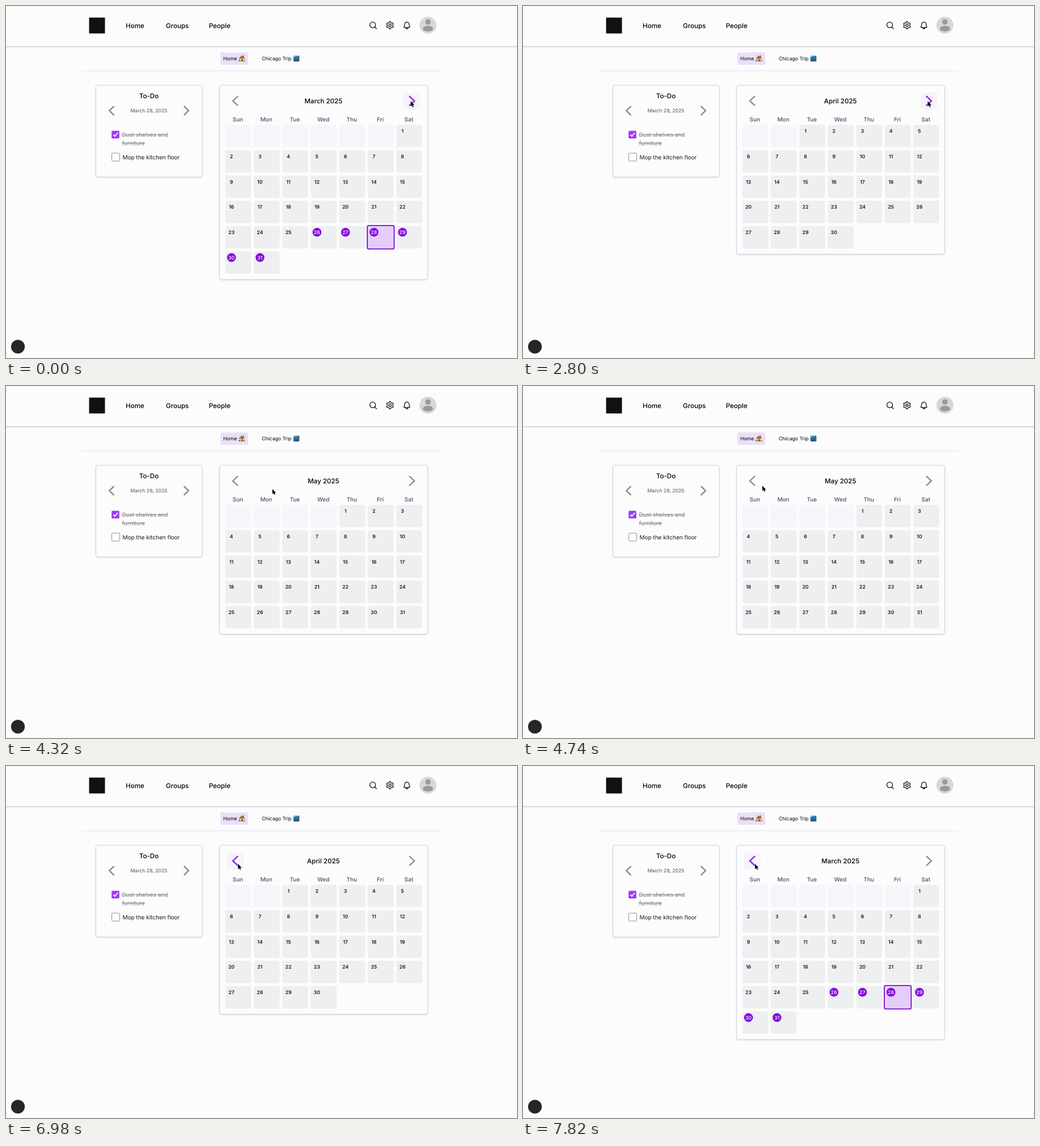
An HTML page that plays this animation: 901 px wide and 622 px high, repeating every 8000 ms.

```html
<!DOCTYPE html>
<html lang="en">
<head>
<meta charset="utf-8">
<title>Shared calendar</title>
<style>
html, body { margin: 0; width: 100%; height: 100%; overflow: hidden; background: #fcfcfc; }
svg { display: block; width: 901px; height: 622px; font-family: Inter, "Liberation Sans", sans-serif; text-rendering: geometricPrecision; }
.mid { text-anchor: middle; }
.nav { font-size: 11.6px; font-weight: 500; }
.small { font-size: 8.7px; }
.body { font-size: 10px; }
.day { font-size: 8.7px; font-weight: 600; text-anchor: middle; fill: #18181b; }
.line { fill: none; stroke: #111; stroke-width: 1.3; stroke-linecap: round; stroke-linejoin: round; }
.chev { fill: none; stroke: #8792a8; stroke-width: 2.5; }
.card { fill: #fcfcfd; stroke: #ccd3e2; filter: drop-shadow(0 1px 1px #0002); }
</style>
</head>
<body>
<svg viewBox="0 0 901 622">
  <rect width="901" height="622" fill="#fcfcfc"/>
  <rect y="72" width="901" height="2" fill="#f1f1f4"/>
  <rect y="71" width="901" height="1.3" fill="#c9c9d4"/>
  <path d="M134 114.5H768" stroke="#e1e3e6"/>

  <rect x="146.5" y="20.5" width="28" height="28" fill="#111"/>
  <g class="nav">
    <text x="211" y="38.5">Home</text>
    <text x="282" y="38.5">Groups</text>
    <text x="357.7" y="38.5">People</text>
  </g>
  <g class="line">
    <circle cx="646.6" cy="33.4" r="5"/>
    <path d="M650.2 37.2L653.3 40.3"/>
    <path id="gear"/>
    <circle cx="677" cy="34" r="2.1"/>
    <path d="M701.4 37.3C702.8 35.8 702.9 34 702.9 32.3A3.9 3.9 0 0 1 710.7 32.3C710.7 34 710.8 35.8 712.2 37.3Q706.8 39 701.4 37.3M704.9 38.4A1.9 1.9 0 0 0 708.7 38.4"/>
  </g>
  <circle cx="744" cy="34" r="15" fill="#d7d7d7"/>
  <circle cx="744" cy="28.2" r="4.8" fill="#999"/>
  <ellipse cx="744" cy="40" rx="9" ry="5" fill="#999"/>

  <rect x="378.3" y="82" width="48.6" height="22" rx="2.5" fill="#eadffa"/>
  <g class="small">
    <text x="383" y="96">Home</text>
    <text x="451" y="96">Chicago Trip</text>
  </g>
  <g>
    <path d="M412 92H420V98H412Z" fill="#e9cf9e"/>
    <path d="M410.3 93L415.8 87.3 421.4 93Z" fill="#a9603e"/>
    <path d="M418 87.5H419.7V91L418 89.5Z" fill="#8c4a35"/>
    <path d="M415 94H417.5V98H415Z" fill="#72432e"/>
    <circle cx="411.8" cy="96.4" r="1.7" fill="#61984b"/>
    <circle cx="420.1" cy="96.8" r="1.4" fill="#61984b"/>
  </g>
  <g>
    <rect x="506.5" y="87.5" width="11" height="10.5" rx="1" fill="#62bde5"/>
    <path d="M507 98V91H510V89H513V92H514V88.5H517V98Z" fill="#285577"/>
    <path d="M508.3 92V97M511.5 90V96M515.5 90V97" stroke="#91cbe2" stroke-width=".7" stroke-dasharray="1 1"/>
  </g>

  <rect class="card" x="158.5" y="140" width="187.5" height="162" rx="4"/>
  <text class="nav mid" x="252" y="163.3">To-Do</text>
  <text class="small mid" x="252" y="188" fill="#475069">March 28, 2025</text>
  <path class="chev" d="M190.5 177L182.3 185 190.5 193M313.7 177L321.9 185 313.7 193"/>
  <rect x="186.2" y="220.5" width="13.6" height="13.5" rx="1.5" fill="#9c3cf6"/>
  <path d="M189.3 227.3L192 230.2 197 224" fill="none" stroke="#fff" stroke-width="1.8"/>
  <rect x="186.5" y="260" width="14" height="14" rx="1.5" fill="#fff" stroke="#8b8f98"/>
  <g class="body">
    <text x="204.4" y="231" fill="#777b82">Dust shelves and</text>
    <text x="204.4" y="245.7" fill="#777b82">furniture</text>
    <text x="205.4" y="270.7" fill="#18181b">Mop the kitchen floor</text>
  </g>
  <path d="M204.4 227.7H285M204.4 242.4H244.6" stroke="#777b82" stroke-width=".8"/>

  <rect class="card" id="card" x="376.5" y="140" width="367" rx="4"/>
  <rect class="hover" x="389" y="153" width="30" height="30" rx="4" fill="#f6f3fc"/>
  <rect class="hover" x="700.5" y="153" width="30" height="30" rx="4" fill="#f6f3fc"/>
  <path class="chev" d="M409 159.2L400 167.7 409 176.2"/>
  <path class="chev" d="M711 159.2L720 167.7 711 176.2"/>
  <g class="hover"><path class="chev" style="stroke:#9531ef" d="M409 159.2L400 167.7 409 176.2"/></g>
  <g class="hover"><path class="chev" style="stroke:#9531ef" d="M711 159.2L720 167.7 711 176.2"/></g>
  <text class="nav mid" id="title" x="559.7" y="172"></text>
  <g id="week" class="body mid" font-weight="500" fill="#475069"></g>
  <g id="days"></g>

  <circle cx="21" cy="602" r="13" fill="#ddd"/>
  <circle cx="21" cy="602" r="12" fill="#262626"/>
  <path id="cursor" d="M0 0V9.2L2.1 7.3 3.6 10.6 5.2 9.9 3.8 6.7H6.5Z" fill="#000" stroke="#fff" stroke-width=".7" paint-order="stroke"/>
</svg>
<script>
const $ = id => document.getElementById(id);
const LEFT = 386.8, TOP = 210, COL = 50.25, ROW = 44.7, W = 45.4, H = 39.6;
const MONTHS = { 2: 'March', 3: 'April', 4: 'May' };
// Start time and zero-based month
const SWITCHES = [[0, 2], [1150, 3], [2810, 4], [5600, 3], [6990, 2]];
// Time, x and y of the pointer tip
const PATH = [[0, 713.6, 168.3], [3300, 713.6, 168.3], [3640, 570, 186.3], [3760, 570, 186.3],
  [4300, 470, 182], [4720, 422, 176.3], [4830, 422, 176.3], [5200, 409, 173], [8000, 409, 173]];
const clamp = v => Math.max(0, Math.min(1, v));
const rect = (x, y, w, h, fill, extra = '') =>
  `<rect x="${x}" y="${y}" width="${w}" height="${h}" rx="3" fill="${fill}" ${extra}/>`;

$('gear').setAttribute('d', 'M' + Array.from({ length: 24 }, (_, i) => {
  const a = (i - 1.5) * Math.PI / 12, r = i % 4 === 1 || i % 4 === 2 ? 6.4 : 4.8;
  return `${677 + r * Math.sin(a)} ${34 - r * Math.cos(a)}`;
}).join('L') + 'Z');

$('week').innerHTML = ['Sun', 'Mon', 'Tue', 'Wed', 'Thu', 'Fri', 'Sat'].map((d, i) =>
  `<text x="${408.8 + i * COL}" y="203.7">${d}</text>`).join('');

let shown;
function showMonth(month) {
  if (month === shown) return;
  shown = month;
  const first = new Date(2025, month, 1).getDay();
  const total = first + new Date(2025, month + 1, 0).getDate();
  let html = '';
  for (let i = 0; i < total; i++) {
    const x = LEFT + i % 7 * COL, y = TOP + Math.floor(i / 7) * ROW, day = i - first + 1;
    if (day < 1) { html += rect(x, y, W, H, '#f5f6fa'); continue; }
    const marked = month === 2 && day >= 26;
    html += marked && day === 28
      ? rect(x - 1, y - 1, W + 2, H + 2, '#e4cdfa', 'stroke="#7d0cc9" stroke-width="1.8"')
      : rect(x, y, W, H, '#eeeff1');
    if (marked) html += `<circle cx="${x + 10.8}" cy="${y + 11}" r="7.8" fill="#8308dc"/>`;
    html += `<text class="day" x="${x + 10.7}" y="${y + 14.2}"${marked ? ' style="fill:#fff;font-weight:500"' : ''}>${day}</text>`;
  }
  $('days').innerHTML = html;
  $('title').textContent = `${MONTHS[month]} 2025`;
  $('card').setAttribute('height', 75 + Math.ceil(total / 7) * ROW);
}

function pointer(t) {
  const i = PATH.findIndex(p => p[0] > t), a = PATH[i - 1], b = PATH[i];
  const k = (t - a[0]) / (b[0] - a[0]), e = k * k * (3 - 2 * k);
  return [a[1] + (b[1] - a[1]) * e, a[2] + (b[2] - a[2]) * e];
}

const hovers = document.querySelectorAll('.hover');
function draw(now) {
  const t = now % 8000;
  showMonth(SWITCHES.filter(s => s[0] <= t).pop()[1]);
  $('cursor').setAttribute('transform', `translate(${pointer(t)})`);
  const left = clamp((t - 4940) / 150), right = 1 - clamp((t - 3400) / 150);
  hovers.forEach((h, i) => h.setAttribute('opacity', i % 2 ? right : left));
  requestAnimationFrame(draw);
}
draw(0);
</script>
</body>
</html>
```
